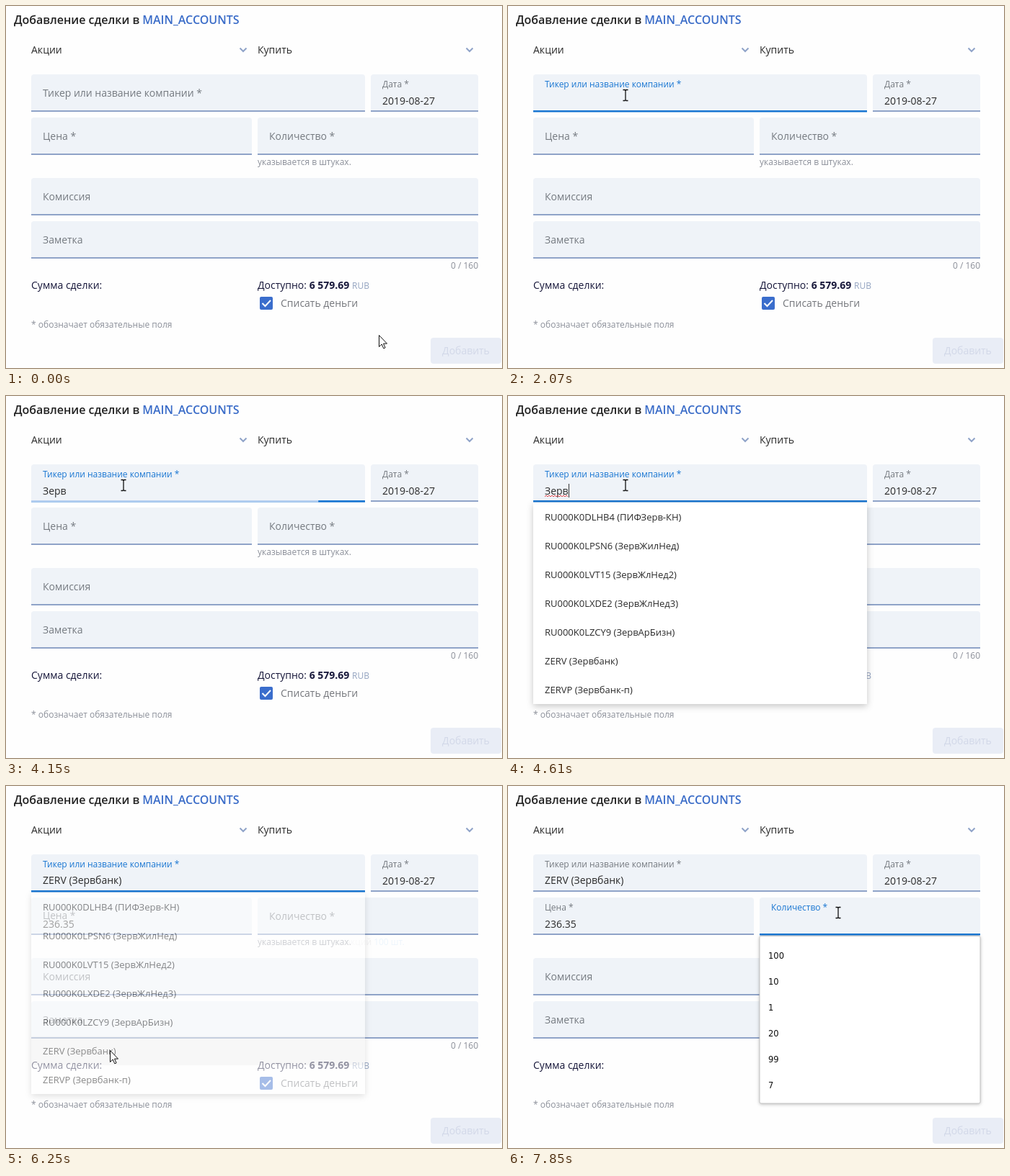
Write an HTML page that moves like this. It is 688 px wide and 503 px high and loops after 8 s.

```html
<!DOCTYPE html>
<html lang="ru">
<head>
<meta charset="utf-8">
<style>
html, body { margin: 0; width: 100%; height: 100%; overflow: hidden; background: #fefefe; }
svg { display: block; width: 688px; height: 503px; font-family: "Open Sans", "Noto Sans", sans-serif; }
text { white-space: pre; }
.menu { filter: drop-shadow(0 3px 5px rgba(0,0,0,.22)); }
.auto { filter: drop-shadow(0 1px 2px rgba(0,0,0,.25)); }
</style>
</head>
<body>
<svg id="stage" viewBox="0 0 688 503"></svg>
<script>
const LOOP = 8000, BLUE = '#1976d2', GRAY = '#757a80', DARK = '#2b2b2b', NAVY = '#17173a';
const QUERY = 'Зерв', PICK = 'ZERV (Зервбанк)';
const ROWS = ['RU000K0DLHB4 (ПИФЗерв-КН)', 'RU000K0LPSN6 (ЗервЖилНед)', 'RU000K0LVT15 (ЗервЖлНед2)',
  'RU000K0LXDE2 (ЗервЖлНед3)', 'RU000K0LZCY9 (ЗервАрБизн)', PICK, 'ZERVP (Зервбанк-п)'];
const KEYS = [3270, 3345, 3430, 3520];
const FOCUS = 530, OPEN = 4560, CHOOSE = 6200, FILL = 6240, NEXT = 7430;
const CLICKS = [480, 6060, 7360];
// time, x, y
const PATH = [[0, 517, 457], [40, 517, 457], [470, 163, 124], [5500, 163, 124], [5690, 171, 339],
  [5840, 171, 339], [5980, 144, 367], [6650, 144, 367], [7080, 397, 185], [7150, 397, 185],
  [7350, 458, 176], [LOOP, 458, 176]];
const FIELDS = [[35, 95, 463], [506, 95, 149], [35, 155, 306], [349, 155, 306], [35, 239, 620], [35, 299, 620]];

const stage = document.getElementById('stage');
const pen = document.createElement('canvas').getContext('2d');
const clamp = v => Math.max(0, Math.min(1, v));

function bezier(x1, y1, x2, y2) {
  const at = (a, b, u) => 3 * a * u * (1 - u) ** 2 + 3 * b * u * u * (1 - u) + u ** 3;
  return x => {
    let lo = 0, hi = 1;
    for (let i = 0; i < 20; i++) {
      const mid = (lo + hi) / 2;
      if (at(x1, x2, mid) < x) lo = mid; else hi = mid;
    }
    return at(y1, y2, hi);
  };
}
const swift = bezier(.25, .8, .5, 1), ease = bezier(.25, .1, .25, 1);
const tween = (t, start) => t <= start ? 0 : swift(clamp((t - start) / 300));

const text = (x, y, s, size = 14, fill = DARK, more = '') =>
  `<text x="${x}" y="${y}" font-size="${size}" fill="${fill}" ${more}>${s}</text>`;
const rect = (x, y, w, h, fill, more = '') =>
  `<rect x="${x}" y="${y}" width="${w}" height="${h}" fill="${fill}" ${more}/>`;
const stroke = (d, color, width) =>
  `<path d="${d}" fill="none" stroke="${color}" stroke-width="${width}"/>`;

function textWidth(s) {
  pen.font = '14px "Open Sans", "Noto Sans", sans-serif';
  return pen.measureText(s).width;
}

function field(i, label, { lift = 0, focus = 0, value = '', base = 42 } = {}) {
  const [x, y, w] = FIELDS[i];
  const color = `color-mix(in srgb, ${BLUE} ${focus * 100}%, ${GRAY})`;
  return `<path d="M${x} ${y + 51}v-47q0-4 4-4h${w - 8}q4 0 4 4v47z" fill="#eff3f8"/>` +
    rect(x, y + 50, w, 2, '#8fa3c8') +
    (focus ? rect(x + w * (1 - focus) / 2, y + 50, w * focus, 2.5, BLUE) : '') +
    text(x + 16, y + 31 - 13 * lift, label, 14 - 2 * lift, GRAY, `style="fill:${color}"`) +
    text(x + 16, y + base, value);
}

function loader(t) {
  if (t < KEYS[0] || t >= OPEN) return '';
  const [x, y, w] = FIELDS[0], p = ease(clamp((t - 3253) / 1320));
  const left = clamp(-2 + 3.07 * p), right = clamp(1.08 * p);
  return rect(x, y + 50, w, 2.5, '#b4cef0') + rect(x + w * left, y + 50, w * (right - left), 2.5, BLUE);
}

function typed(t) {
  return t < CHOOSE ? QUERY.slice(0, KEYS.filter(k => k <= t).length) : PICK;
}

function caret(t) {
  const flips = [FOCUS + 10, 1030, 1520, 2070, 2580, 3090, KEYS[0], 4070, OPEN, 5120, 5650, 6160];
  if (t >= NEXT && t < 7850) return rect(365, 182, 1, 19, '#333');
  if (flips.filter(f => f <= t).length % 2 === 0) return '';
  return rect(51 + Math.round(textWidth(typed(t))), 122, 1, 19, '#333');
}

function squiggle() {
  let d = 'M51 140';
  for (let x = 53, end = 51 + textWidth(QUERY); x < end; x += 2) d += `L${x} ${x % 4 === 1 ? 138 : 140}`;
  return stroke(d, '#e5484d', 1);
}

function menu(t) {
  if (t < OPEN || t > CHOOSE + 300) return '';
  const alpha = t < CHOOSE ? (t < OPEN + 50 ? .6 : 1) : 1 - tween(t, CHOOSE);
  return `<g opacity="${alpha}">` + rect(35, 148, 463, 280, '#fff', 'class="menu"') +
    (t >= 5850 ? rect(35, 348, 463, 40, '#f3f3f3') : '') +
    ROWS.map((s, i) => text(51, 173 + 40 * i, s, 13)).join('') + '</g>';
}

function suggestions(t) {
  if (t < NEXT + 10) return '';
  return rect(349, 208.5, 306, 232.5, '#fff', 'rx="2" stroke="#c4c4c4" class="auto"') +
    [100, 10, 1, 20, 99, 7].map((n, i) =>
      text(361, 240 + 36 * i, n, 11.5, '#111', 'font-family="DejaVu Sans, sans-serif"')).join('');
}

function cursor(t) {
  const i = PATH.findIndex(k => k[0] > t), [t0, x0, y0] = PATH[i - 1], [t1, x1, y1] = PATH[i];
  let p = (t - t0) / (t1 - t0);
  p = p * p * (3 - 2 * p);
  const x = x0 + (x1 - x0) * p, y = y0 + (y1 - y0) * p;
  const listed = t >= OPEN && t < CHOOSE && x < 498 && y > 148;
  const inField = FIELDS.some(([fx, fy, w]) => x > fx && x < fx + w && y > fy && y < fy + 52);
  const pressed = CLICKS.some(c => t >= c && t < c + 130);
  let shape;
  if (listed) {
    shape = '<path d="M-1 1.5q0-1.5 1.5-1.5t1.5 1.5v6q2.5-1 3 .7 2.3-.8 2.8.9 2.7-.5 2.7 2v3.4q0 2.500-1.500 4.500v2h-8v-2l-5.500-6.500q-1-2 .5-2.300 1.500-.2 3 2z" fill="#fff" stroke="#111"/>' +
      stroke('M2 7.500v4M5 8.500v3M8 9.500v2', '#111', 1);
  } else if (inField) {
    shape = stroke('M-3.500-7.500h2.500l1 1 1-1h2.500M-3.500 7.500h2.500l1-1 1 1h2.500M0-7v14', '#111', 1.3);
  } else {
    shape = '<path d="M.5.500v16l3.700-3.500 2.600 5.800 2.300-1-2.600-5.700h5z" fill="#fff" stroke="#111"/>';
  }
  return (pressed ? `<circle cx="${x - (listed ? 2 : 0)}" cy="${y}" r="12" fill="#fff200" opacity=".72"/>` : '') +
    `<g transform="translate(${x} ${y})">${shape}</g>`;
}

function hint(t) {
  const p = tween(t, FILL);
  return text(349, 221, 'указывается в штуках.', 12, '#8b8f99', `opacity="${1 - p}"`) +
    text(349, 221, 'Текущее количество акций <tspan fill="#6bb1ec">100 шт.</tspan>', 12, '#8b8f99', `opacity="${p}"`);
}

function scene(t) {
  const lift = tween(t, FOCUS), next = tween(t, NEXT);
  return text(11, 25, 'Добавление сделки в <tspan fill="#3a6cc8">MAIN_ACCOUNTS</tspan>', 16, '#222', 'font-weight="600"') +
    text(35, 66, 'Акции') + text(349, 66, 'Купить') +
    [329, 643].map(x => stroke(`M${x - 4.5} 58.500l4.500 4.500 4.500-4.500`, '#8fa3c8', 2)).join('') +
    field(0, 'Тикер или название компании *',
      { lift, focus: lift * (1 - next), value: typed(t), base: t < CHOOSE ? 42 : 41 }) +
    loader(t) +
    field(1, 'Дата *', { lift: 1, value: '2019-08-27' }) +
    field(2, 'Цена *', { lift: tween(t, FILL), value: t < FILL ? '' : '236.35' }) +
    field(3, 'Количество *', { lift: next, focus: next }) +
    hint(t) +
    field(4, 'Комиссия') + field(5, 'Заметка') +
    text(655, 365, '0 / 160', 12, '#8b8f99', 'text-anchor="end"') +
    text(35, 393, 'Сумма сделки:', 14, NAVY) +
    text(349, 393, 'Доступно: <tspan font-weight="700">6 579.69</tspan>', 14, NAVY) +
    text(480, 393, 'RUB', 12, '#93a3c0') +
    rect(352, 404, 18, 18, '#3a6dcc', 'rx="2"') +
    stroke('M355.500 413l4 4 7.500-8', '#fff', 2) +
    text(381, 418, 'Списать деньги', 14, '#75777c') +
    text(35, 447, '* обозначает обязательные поля', 12, '#8b8f99') +
    rect(589, 461, 98, 36, '#e9edf6', 'rx="4"') +
    text(638, 484, 'Добавить', 14, '#d2d8e8', 'text-anchor="middle"') +
    (t >= OPEN && t < CHOOSE ? squiggle() : '') +
    caret(t) + menu(t) + suggestions(t) + cursor(t);
}

function draw() {
  stage.innerHTML = scene(performance.now() % LOOP);
  requestAnimationFrame(draw);
}
draw();
</script>
</body>
</html>
```
